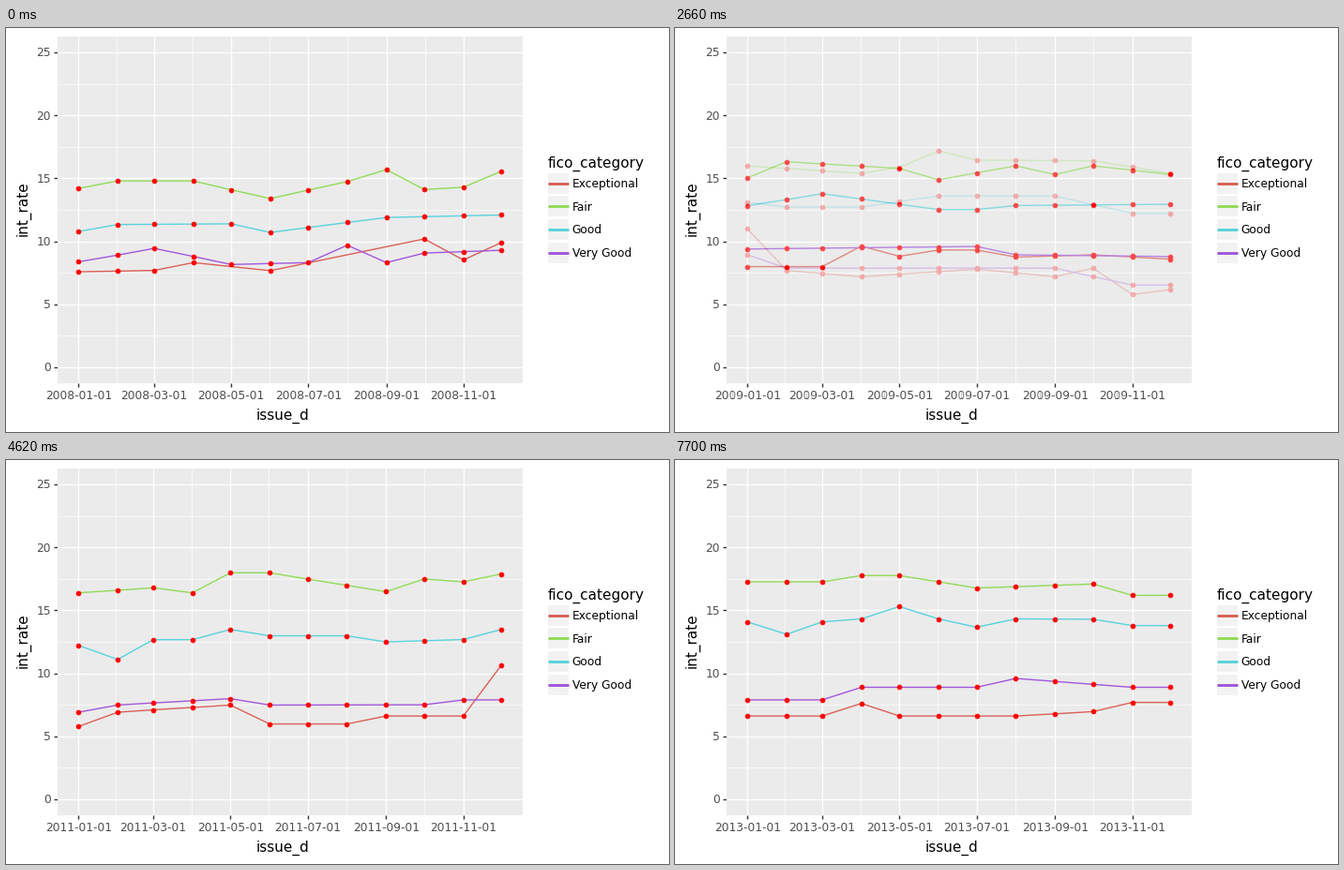
A matplotlib script for the animation above (8 s loop, 707 px wide and 431 px high).

```python
import matplotlib.pyplot as plt
import numpy as np
from matplotlib.animation import FuncAnimation
from matplotlib.patches import Rectangle

W, H, DPI = 707, 431, 100
TICK_MS, LOOP_MS = 20, 8000
HOLD_MS, STEP_MS, STEPS = 1000, 60, 10
PERIOD_MS = HOLD_MS + STEP_MS * (STEPS - 1)

LEFT, RIGHT, TOP, BOTTOM = 54.7, 550.7, 9.3, 378.9
X_FIRST, X_SPAN = 77.25, 450.9
Y_ZERO, Y_UNIT = 362.1, 13.44
TITLE_PT, LABEL_PT = 11, 8.8
COLORS = {"Exceptional": "#db5f57", "Fair": "#91db57",
          "Good": "#57d3db", "Very Good": "#a157db"}
MONTHS = "jan feb mar apr may jun jul aug sep oct nov dec".split()


def pixel_axes():
    ax = fig.add_axes([0, 0, 1, 1])
    ax.set(xlim=(0, W), ylim=(H, 0))
    ax.axis("off")
    return ax


def box(ax, x0, y0, x1, y1, color):
    ax.add_patch(Rectangle((x0, y0), x1 - x0, y1 - y0, fc=color, lw=0))


def label(ax, x, y, text, size=LABEL_PT, color="black", **kw):
    ax.text(x, y, text, size=size, color=color, va="baseline", **kw)


def y_pos(rate):
    return Y_ZERO - Y_UNIT * np.asarray(rate, float)


def month_positions(year):
    months = np.arange(f"{year}-01", f"{year + 1}-01", dtype="datetime64[M]")
    days = months.astype("datetime64[D]").astype(int)
    return X_FIRST + X_SPAN * (days - days[0]) / (days[-1] - days[0])


def trend(skip="", **turns):
    """Monthly rates on straight runs between the turning points."""
    rates = np.interp(range(12), [MONTHS.index(m) for m in turns], list(turns.values()))
    rates[[m in skip for m in MONTHS]] = np.nan
    return rates


def year_layer(year, *rates):
    """Panel, date axis and data of one year; rates follow the order of COLORS."""
    ax = pixel_axes()
    months = month_positions(year)
    major = months[::2]
    box(ax, 35, 379, 535, 400, "white")
    box(ax, LEFT, TOP, RIGHT, BOTTOM, "#ebebeb")

    ax.hlines(y_pos(np.arange(2.5, 25, 5)), LEFT, RIGHT, "white", lw=0.5)
    ax.vlines((major[1:] + major[:-1]) / 2, TOP, BOTTOM, "white", lw=0.5)
    ax.hlines(y_pos(np.arange(0, 26, 5)), LEFT, RIGHT, "white", lw=1)
    ax.vlines(major, TOP, BOTTOM, "white", lw=1)
    ax.vlines(major, BOTTOM, BOTTOM + 3.8, "#333333", lw=1)
    for x, month in zip(major, range(1, 12, 2)):
        label(ax, x, 396, f"{year}-{month:02}-01", color="#4d4d4d", ha="center")

    for color, values in zip(COLORS.values(), rates):
        known = ~np.isnan(values)
        ax.plot(months[known], y_pos(values)[known], color=color, lw=1)
    for values in rates:
        ax.scatter(months, y_pos(values), s=4 * np.pi, color="red", lw=0.5, zorder=3)
    return ax


def draw_axis_and_legend():
    ax = pixel_axes()
    for rate in range(0, 26, 5):
        y = y_pos(rate)
        ax.hlines(y, LEFT - 3.8, LEFT, "#333333", lw=1)
        label(ax, 48, y + 4.2, str(rate), color="#4d4d4d", ha="right")
    label(ax, 295, 418, "issue_d", TITLE_PT, ha="center")
    label(ax, 22, 193, "int_rate", TITLE_PT, ha="center",
          rotation=90, rotation_mode="anchor")

    label(ax, 577.5, 149, "fico_category", TITLE_PT)
    for i, (name, color) in enumerate(COLORS.items()):
        y = 165.7 + 24.7 * i
        box(ax, 578, y - 11, 600, y + 11, "#f2f2f2")
        ax.plot([578, 600], [y, y], color=color, lw=2.1, solid_capstyle="butt")
        label(ax, 603.5, y + 4.2, name)


fig = plt.figure(figsize=((W + 1e-6) / DPI, (H + 1e-6) / DPI), dpi=DPI, facecolor="white")
draw_axis_and_legend()
layers = [
    year_layer(
        2008,
        trend("may jul aug sep", jan=7.59, mar=7.7, apr=8.32, jun=7.68,
              oct=10.2, nov=8.53, dec=9.91),
        trend(jan=14.21, feb=14.8, apr=14.8, jun=13.4, aug=14.75, sep=15.7,
              oct=14.12, nov=14.3, dec=15.57),
        trend(jan=10.79, feb=11.34, may=11.4, jun=10.71, sep=11.9, dec=12.1),
        trend(jan=8.38, mar=9.45, may=8.17, jul=8.32, aug=9.7, sep=8.32,
              oct=9.08, dec=9.3)),
    year_layer(
        2009,
        trend(mar=8, apr=9.63, may=8.82, jun=9.32, jul=9.32, aug=8.76, oct=8.94, dec=8.59),
        trend(jan=15.05, feb=16.33, may=15.8, jun=14.89, aug=16, sep=15.31,
              oct=16, dec=15.31),
        trend(jan=12.84, mar=13.79, jun=12.53, jul=12.53, aug=12.85, dec=12.95),
        trend(jan=9.4, jul=9.6, aug=8.94, dec=8.8)),
    year_layer(
        2010,
        trend(jan=10.99, feb=7.7, apr=7.2, jul=7.8, sep=7.2, oct=7.88, nov=5.79, dec=6.17),
        trend(jan=16, apr=15.4, may=15.88, jun=17.19, jul=16.45, oct=16.4, dec=15.4),
        trend(jan=13.11, feb=12.73, apr=12.73, jun=13.61, sep=13.61, nov=12.23),
        trend(jan=8.94, feb=7.88, sep=7.88, nov=6.54)),
    year_layer(
        2011,
        trend(jan=5.79, feb=6.92, may=7.49, jun=5.99, aug=5.99, sep=6.62,
              nov=6.62, dec=10.65),
        trend(jan=16.4, mar=16.8, apr=16.4, may=17.99, jun=17.99, sep=16.49,
              oct=17.5, nov=17.27, dec=17.9),
        trend(jan=12.23, feb=11.11, mar=12.68, apr=12.68, may=13.49, jun=12.99,
              aug=12.99, sep=12.5, nov=12.69, dec=13.49),
        trend(jan=6.92, feb=7.49, may=8, jun=7.49, oct=7.51, nov=7.9)),
    year_layer(
        2012,
        trend(jan=7.8, mar=7.62, apr=6.62, oct=6.62, nov=6.1),
        trend(jan=17.2, mar=18.1, nov=18.49, dec=17.27),
        trend(feb=12.69, jul=14.09),
        trend(jan=7.6, nov=7.65, dec=7.9)),
    year_layer(
        2013,
        trend(mar=6.62, apr=7.62, may=6.62, aug=6.62, oct=6.97, nov=7.7),
        trend(mar=17.27, apr=17.77, may=17.77, jul=16.78, oct=17.1, nov=16.2),
        trend(jan=14.09, feb=13.11, mar=14.09, apr=14.33, may=15.31, jun=14.33,
              jul=13.67, aug=14.33, oct=14.3, nov=13.8),
        trend(mar=7.9, apr=8.9, jul=8.9, aug=9.6, nov=8.9)),
]


def fade(alpha):
    """Filter that makes a whole layer evenly translucent."""
    return lambda image, dpi: (image * [1, 1, 1, alpha], 0, 0)


def update(frame):
    current, elapsed = divmod(frame * TICK_MS, PERIOD_MS)
    step = max(0, (elapsed - HOLD_MS) // STEP_MS + 1)
    for i, layer in enumerate(layers):
        incoming = i == current + 1 and step > 0
        layer.set_visible(i == current or incoming)
        layer.set_agg_filter(fade(step / STEPS) if incoming else None)
    return layers


anim = FuncAnimation(fig, update, frames=LOOP_MS // TICK_MS, interval=TICK_MS,
                     repeat=True, repeat_delay=0, blit=False)
plt.show()
```
